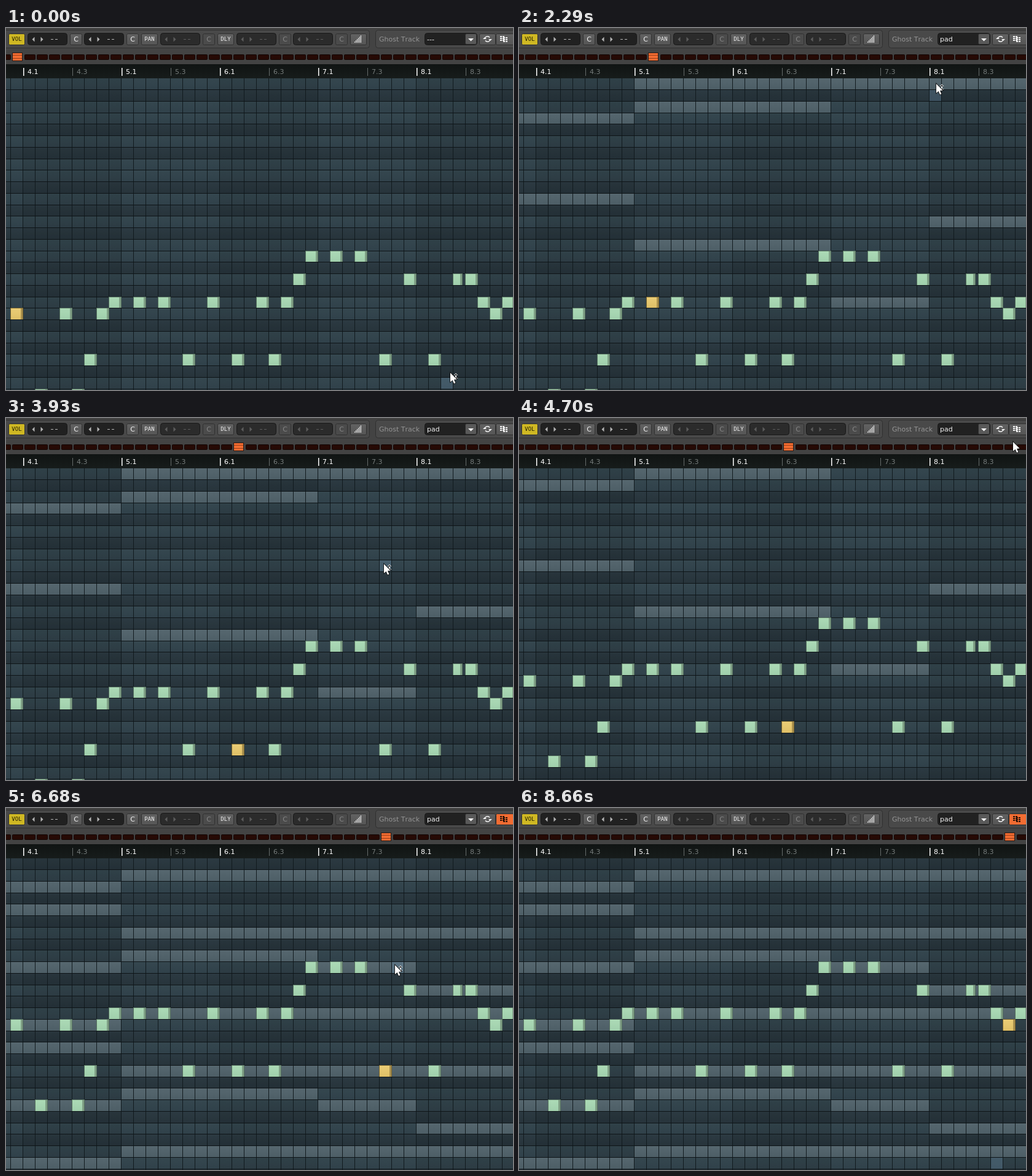
These frames come from a looping animation (825x590 px, 8.78 s). An HTML page with a canvas:

```html
<!DOCTYPE html>
<html lang="en">
<head>
<meta charset="utf-8">
<title>Piano roll ghost track</title>
<style>
html, body { margin: 0; width: 100%; height: 100%; overflow: hidden; background: #434343; }
canvas { display: block; width: 825px; height: 590px; }
</style>
</head>
<body>
<canvas id="stage" width="825" height="590"></canvas>
<script>
const ctx = document.getElementById('stage').getContext('2d');
const W = 825, LOOP = 8780, ROWS = 28, CELL = 20;
const ORANGE = '#f26c32';
const SANS = '11px "DejaVu Sans", sans-serif';
const TINY = '9px "DejaVu Sans Mono", monospace';
ctx.fontKerning = 'none';

const MENU_OPEN = 980, MENU_PICK = 2180, SCALE_ON = 5360;
const WHEEL_UP = [3500], WHEEL_DOWN = [3930, 4150, 6240, 6680];
// [time, x, y] of the pointer
const POINTER = [[90, 723, 562], [1200, 735, 17], [1410, 735, 17], [1960, 703, 34],
  [2180, 703, 34], [3200, 615, 238], [4150, 615, 238], [4700, 804, 39], [5030, 812, 4],
  [5470, 809, 14], [5910, 633, 256], [7450, 633, 256], [8110, 772, 600]];

// One letter per step, upper case for the higher octave
const MELODY = 'b.e.begbc.c.c.g.c.g.cgcDE.E.E.g.D.g.DDcbc';
const PITCH_ROW = { E: 15, D: 17, c: 19, b: 20, g: 24, e: 27 };
const SHORT_STEP = 36;
// One chord per section: the rows played, and its rows within any octave
const CHORDS = [
  { from: -12, to: 187, rows: [3, 10], classes: [3, 8, 10] },
  { from: 188, to: 507, rows: [0, 2, 14], classes: [0, 2, 7] },
  { from: 508, to: 667, rows: [0, 19], classes: [0, 3, 7] },
  { from: 668, to: 827, rows: [0, 12], classes: [0, 5, 7] }
];
const BLACK_KEYS = [1, 4, 6, 9, 11];

const octaveRow = row => (row % 12 + 12) % 12;
const rowY = k => Math.floor(81.9 + 18.75 * k);
const easeOut = p => 1 - (1 - p) ** 3;
const passed = (times, t) => times.filter(e => e <= t).length;

// The screen refreshes about nine times a second
const tick = t => t < 90 ? 0 : 90 + Math.floor((t - 90) / 109.74) * 109.74;
const stepAt = t => Math.floor((t + 159.2) / 224.2);
const scrollAt = t => 2 * (passed(WHEEL_DOWN, t) - passed(WHEEL_UP, t));

function pointerAt(t) {
  const i = Math.max(0, POINTER.findLastIndex(e => e[0] <= t));
  const a = POINTER[i], b = POINTER[i + 1] || a;
  const p = a === b ? 0 : easeOut(Math.max(0, (t - a[0]) / (b[0] - a[0])));
  return { x: Math.round(a[1] + (b[1] - a[1]) * p), y: Math.round(a[2] + (b[2] - a[2]) * p) };
}

function rect(x, y, w, h, fill) {
  ctx.fillStyle = fill;
  ctx.fillRect(x, y, w, h);
}
function shade(y, h, top, bottom) {
  const g = ctx.createLinearGradient(0, y, 0, y + h);
  g.addColorStop(0, top);
  g.addColorStop(1, bottom);
  return g;
}
function box(x, y, w, h, fill, line, r = 3) {
  ctx.beginPath();
  ctx.roundRect(x + .5, y + .5, w - 1, h - 1, r);
  ctx.fillStyle = fill;
  ctx.fill();
  ctx.strokeStyle = line;
  ctx.lineWidth = 1;
  ctx.stroke();
}
function text(s, x, y, color, font = SANS, align = 'left') {
  ctx.font = font;
  ctx.textAlign = align;
  ctx.fillStyle = color;
  ctx.fillText(s, x, y);
}
function poly(points, fill, line, width = 1) {
  ctx.beginPath();
  points.forEach(([x, y]) => ctx.lineTo(x, y));
  ctx.closePath();
  if (line) { ctx.strokeStyle = line; ctx.lineWidth = width; ctx.stroke(); }
  ctx.fillStyle = fill;
  ctx.fill();
}
function triangle(x, y, dx, dy, color) {
  poly([[x + dx, y + dy], [x - dy, y + dx], [x + dy, y - dx]], color);
}

function button(x, w, label, font, dim, fill) {
  box(x, 9, w, 19, fill || (dim ? '#4b4b4b' : shade(9, 19, '#626262', '#555')), '#303030', 2);
  if (label) text(label, x + w / 2, font === TINY ? 21 : 22, fill ? '#201c00' : dim ? '#858585' : '#f2f2f2', font, 'center');
}
function valueBox(x, dim) {
  const c = dim ? '#5c5c5c' : '#b4b4b4';
  box(x, 8, 65, 20, dim ? '#2b2b2b' : '#212121', '#181818', 4);
  triangle(x + 11.5, 18.5, -4, 0, c);
  triangle(x + 21.5, 18.5, 4, 0, c);
  rect(x + 38, 18, 4, 1, c);
  rect(x + 45, 18, 4, 1, c);
}
function refreshIcon(x, y, color) {
  ctx.strokeStyle = color;
  ctx.lineWidth = 1.6;
  for (const side of [1, -1]) {
    const a = side > 0 ? Math.PI : 0;
    ctx.beginPath();
    ctx.arc(x, y, 4.3, a + .2, a + 2.5);
    ctx.stroke();
    triangle(x + 4.5 * side, y, 0, 3 * side, color);
  }
}
function gridIcon(x, y, color) {
  for (let i = 0; i < 12; i++) {
    const sheet = i > 5, n = i % 6;
    rect(x + (sheet ? 5 : 0) + (n % 2) * 4, y + (sheet ? 2 : 0) + (n >> 1) * 3, 3, 2, color);
  }
}

function drawToolbar(picked, scale) {
  rect(0, 0, W, 60, '#434343');
  box(-6, 3, 598, 30, '#494949', '#303030', 4);
  box(601, 3, 240, 30, '#494949', '#303030', 4);
  button(4, 27, 'VOL', TINY, false, '#cfb823');
  button(220, 27, 'PAN', TINY);
  button(344, 27, 'DLY', TINY);
  [35, 127, 251, 375, 467].forEach((x, i) => {
    valueBox(x, i > 1);
    button(x + 69, 20, 'C', SANS, i > 1);
  });
  button(560, 27);
  for (let i = 0; i < 6; i++) rect(567 + i * 2, 22 - i * 2, 1, 2 + i * 2, '#eee');
  text('Ghost Track', 607, 22, '#949494');
  box(681, 8, 86, 20, '#212121', '#181818', 4);
  text(picked ? 'pad' : '---', 685, 22, '#f2f2f2');
  box(747, 9, 19, 18, '#595959', '#303030', 2);
  triangle(756.5, 17, 0, 4.5, '#fff');
  button(770, 27);
  refreshIcon(783.5, 18, '#f4f4f4');
  button(797, 32, '', SANS, false, scale ? ORANGE : undefined);
  gridIcon(804, 13, scale ? '#2c1206' : '#f4f4f4');
}

function drawStepStrip(step) {
  for (let x = -10, i = -1; x < W; x += CELL, i++) {
    if (i === step) {
      rect(x, 40, 17, 14, '#2a1a14');
      rect(x + 1, 41, 15, 12, ORANGE);
      rect(x + 1, 44, 15, 1, '#9c3e18');
      rect(x + 1, 49, 15, 1, '#9c3e18');
    } else {
      box(x, 43, 18, 9, '#260a05', '#120604', 1);
    }
  }
}

function drawRuler() {
  rect(0, 59, W, 23, shade(59, 23, '#101413', '#171c1b'));
  for (let i = 0; i < 10; i++) {
    const x = 28 + i * 80, strong = i % 2 === 0;
    rect(x, 65, strong ? 1.5 : 1, 13, strong ? '#fff' : '#666c6b');
    text(`${4 + (i >> 1)}.${strong ? 1 : 3}`, x + 7, 75, strong ? '#fff' : '#747a79');
  }
}

function drawNote(step, y, h, lit) {
  const x = 8 + step * CELL, w = step === SHORT_STEP ? 15 : 20;
  rect(x - 1, y - 1, w + 1, h + 1, lit ? '#75622f' : '#56705f');
  rect(x, y, w - 4, h, lit ? shade(y, h, '#ebcd76', '#dfc067') : shade(y, h, '#acdab6', '#a0cfac'));
  rect(x + w - 4, y, 3, h, lit ? '#ab914d' : '#7f9f85');
}

function drawGrid(step, scroll, picked, scale, pointer) {
  const eachRow = fn => {
    for (let k = 0; k < ROWS; k++) {
      const y = rowY(k) + 1;
      fn(k + scroll, y, rowY(k + 1) - y);
    }
  };
  ctx.save();
  ctx.beginPath();
  ctx.rect(0, 82, W, 508);
  ctx.clip();
  eachRow((row, y, h) => {
    const black = BLACK_KEYS.includes(octaveRow(row));
    rect(0, y, W, h, black ? shade(y, h, '#2c3a42', '#27343b') : shade(y, h, '#35474f', '#30414a'));
  });
  for (let x = 28; x < W; x += 320) rect(x, 82, 160, 508, 'rgba(0,0,0,.09)');
  if (picked) eachRow((row, y, h) => {
    for (const c of CHORDS)
      if (scale ? c.classes.includes(octaveRow(row)) : c.rows.includes(row))
        rect(c.from, y, c.to - c.from, h, shade(y, h, '#56676f', '#4d5e66'));
  });
  if (pointer.y > 78) {
    const hoverX = 8 + CELL * Math.floor((pointer.x - 5) / CELL);
    const hoverY = Math.min(pointer.y + 9, 587);
    eachRow((row, y, h) => {
      if (hoverY >= y - 1 && hoverY < y + h) rect(hoverX, y, 19, h, 'rgba(100,135,160,.38)');
    });
  }
  for (let x = 7; x < W; x += CELL) rect(x, 82, 1, 508, '#111a1e');
  for (let k = 1; k < ROWS; k++) rect(0, rowY(k), W, 1, '#0e1417');
  eachRow((row, y, h) => [...MELODY].forEach((pitch, s) => {
    if (PITCH_ROW[pitch] === row) drawNote(s, y, h, s === step);
  }));
  ctx.restore();
}

function drawMenu(pointer) {
  const left = 680, top = 28, w = 85, item = 20, h = 4 * item;
  const hover = pointer.y < top ? 1 : Math.floor((pointer.y - top) / item);
  rect(left, top, w, h, '#262626');
  for (const sx of [1, -1]) for (const sy of [1, -1]) {
    const x = sx > 0 ? left : left + w, y = sy > 0 ? top : top + h;
    rect(x, y, 12 * sx, 5 * sy, ORANGE);
    rect(x, y, 5 * sx, 12 * sy, ORANGE);
  }
  ['pad', '---', 'Track 03', 'Track 04'].forEach((label, i) => {
    const y = top + i * item;
    if (i === hover) box(left, y, w, item, ORANGE, ORANGE);
    text(label, 682, y + 13, i === hover ? '#1c0d06' : '#dcdcdc');
  });
}

function drawPointer({ x, y }) {
  if (y > 78) {
    rect(x + 8, y + 4, 2, 5, '#e8e8e8');
    for (const side of [1, -1]) triangle(x + 9, y + 6 + 2 * side, 0, 3.5 * side, '#e8e8e8');
    for (const side of [1, -1]) triangle(x + 9, y + 6 + 2 * side, 0, 2.2 * side, '#111');
  }
  const arrow = [[0, 0], [0, 15], [3.6, 12], [6, 17.5], [8.4, 16.5], [6, 11], [10.5, 10.5]];
  poly(arrow.map(([a, b]) => [x + a, y + b]), '#fff', '#111', 1.6);
}

function draw(t) {
  const frame = tick(t), step = stepAt(frame), pointer = pointerAt(frame);
  const picked = t >= MENU_PICK, scale = t >= SCALE_ON;
  drawGrid(step, scrollAt(t), picked, scale, pointer);
  drawToolbar(picked, scale);
  drawStepStrip(step);
  drawRuler();
  if (t >= MENU_OPEN && !picked) drawMenu(pointer);
  drawPointer(pointer);
}

const start = performance.now();
function loop() {
  draw((performance.now() - start) % LOOP);
  requestAnimationFrame(loop);
}
loop();
</script>
</body>
</html>
```
